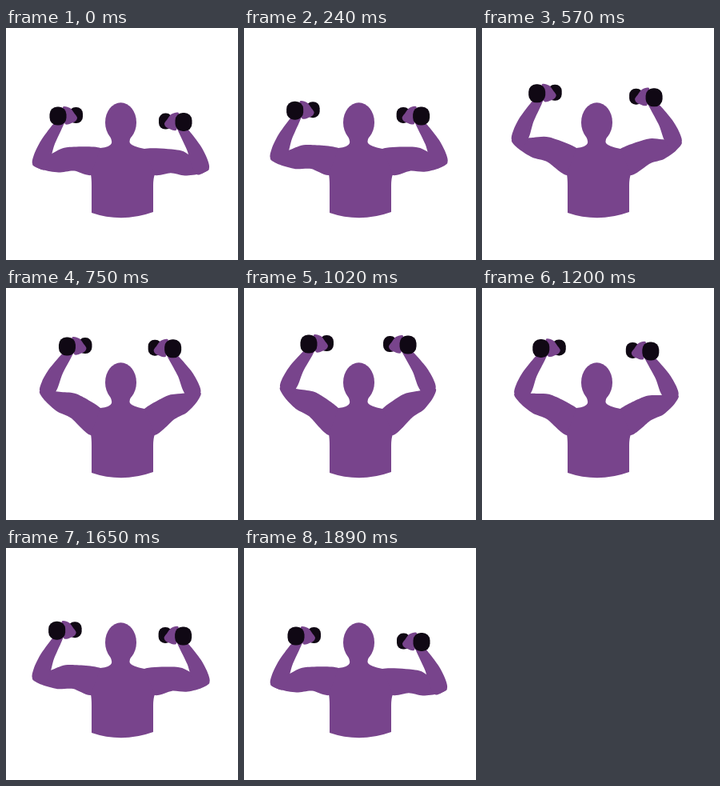
Write an HTML page with a canvas that moves like this. It is 290 by 290 pixels and loops after 2.01 s.

```html
<!DOCTYPE html>
<html lang="en">
<head>
<meta charset="utf-8">
<title>Shoulder press</title>
<style>
  html, body { margin: 0; width: 100%; height: 100%; overflow: hidden; background: #fff; }
  canvas { display: block; width: 290px; height: 290px; }
</style>
</head>
<body>
<canvas id="stage" width="290" height="290"></canvas>
<script>
const ctx = document.getElementById('stage').getContext('2d');
const SKIN = '#78448c', IRON = '#100814';
const LOOP = 2010, STEP = 30, MOVE = 1890;

// Elbows and hands swing on circles; angles in degrees below the horizontal.
const arms = [
  {
    side: 1, shoulder: [106, 164.5], chest: [118, 150], armpit: [106, 184],
    elbow: { x: 106, y: 164.5, r: 73, from: 4.3, sweep: 40 },
    hand: { x: 98, y: 100, r: 34.5, from: 16.9, sweep: 81.3 }
  },
  {
    side: -1, shoulder: [188, 166], chest: [173, 151], armpit: [186, 184],
    elbow: { x: 189.5, y: 167, r: 64.8, from: 7.9, sweep: 50 },
    hand: { x: 150.5, y: 117.3, r: 71.5, from: 0.2, sweep: 42.6 }
  }
];

// Outlines along a bone: fraction of its length, then pixels to its inner side.
const upperShape = [[0.4, 17.5], [0.66, 11], [1, 0], [0.84, -8], [0.57, -13], [0.3, -12.5]];
const foreShape = [
  [0, 0], [0.18, -4], [0.45, -4.5], [0.8, -1], [1, 3],
  [1, 10], [0.86, 11.5], [0.5, 13], [0.22, 17], [0, 16]
];
const gripShape = [[6, -11], [15, -10], [20, -4], [24, 2], [21, 7], [9, 10]];

const body = new Path2D(
  'M128 132 Q133 140 132 144 Q130 149 118 150 L106 183 Q107 188 107 197 V231 ' +
  'Q145 244 184 230 V197 Q184 188 186 183 L173 151 Q158 148 155 144 Q153 140 159 132 Z');

function orbit({ x, y, r, from, sweep }, side, k) {
  const a = (from - sweep * k) * Math.PI / 180;
  return [x - side * r * Math.cos(a), y + r * Math.sin(a)];
}

// Place an outline on the bone from a to b.
function along(shape, a, b, side) {
  const dx = b[0] - a[0], dy = b[1] - a[1];
  const s = side / Math.hypot(dx, dy);
  return shape.map(([u, v]) => [a[0] + dx * u - dy * s * v, a[1] + dy * u + dx * s * v]);
}

// Smooth closed curve through the points.
function blob(points) {
  const n = points.length;
  ctx.fillStyle = SKIN;
  ctx.beginPath();
  ctx.moveTo(...points[0]);
  for (let i = 0; i < n; i++) {
    const a = points[(i + n - 1) % n], b = points[i];
    const c = points[(i + 1) % n], d = points[(i + 2) % n];
    ctx.bezierCurveTo(
      b[0] + (c[0] - a[0]) / 8, b[1] + (c[1] - a[1]) / 8,
      c[0] - (d[0] - b[0]) / 8, c[1] - (d[1] - b[1]) / 8, c[0], c[1]);
  }
  ctx.fill();
}

// Rounded plate of a dumbbell, centred at x, y.
function plate(x, y, w, h, r) {
  ctx.fillStyle = IRON;
  ctx.beginPath();
  ctx.roundRect(x - w / 2, y - h / 2, w, h, r);
  ctx.fill();
}

function drawArm({ side, shoulder, chest, armpit, elbow, hand }, k) {
  const base = [shoulder[0], shoulder[1] - 4 * k];
  const joint = orbit(elbow, side, k);
  const [hx, hy] = orbit(hand, side, k);
  plate(hx + 22.5 * side, hy - 1, 17, 20, 8);
  blob(gripShape.map(([x, y]) => [hx + x * side, hy + y]));
  const inner = [chest[0] + 12 * side, 170];
  blob([chest, ...along(upperShape, base, joint, side), armpit, inner]);
  blob(along(foreShape, joint, [hx, hy], side));
  plate(hx, hy, 21, 23, 9.5);
}

// Eased way up from either end of the movement.
function lift(t) {
  const x = Math.max(0, Math.min(t, MOVE - t)) / (LOOP / 2);
  return x * x * (3 - 2 * x);
}

function draw(now) {
  const k = lift(Math.floor((now % LOOP) / STEP) * STEP);
  ctx.fillStyle = '#fff';
  ctx.fillRect(0, 0, 290, 290);
  for (const arm of arms) drawArm(arm, k);
  ctx.fillStyle = SKIN;
  ctx.fill(body);
  ctx.beginPath();
  ctx.ellipse(143.5, 118, 19.5, 24.7, 0, 0, Math.PI * 2);
  ctx.fill();
}

let start;
function tick(now) {
  start ??= now;
  draw(now - start);
  requestAnimationFrame(tick);
}
draw(0);
requestAnimationFrame(tick);
</script>
</body>
</html>
```
